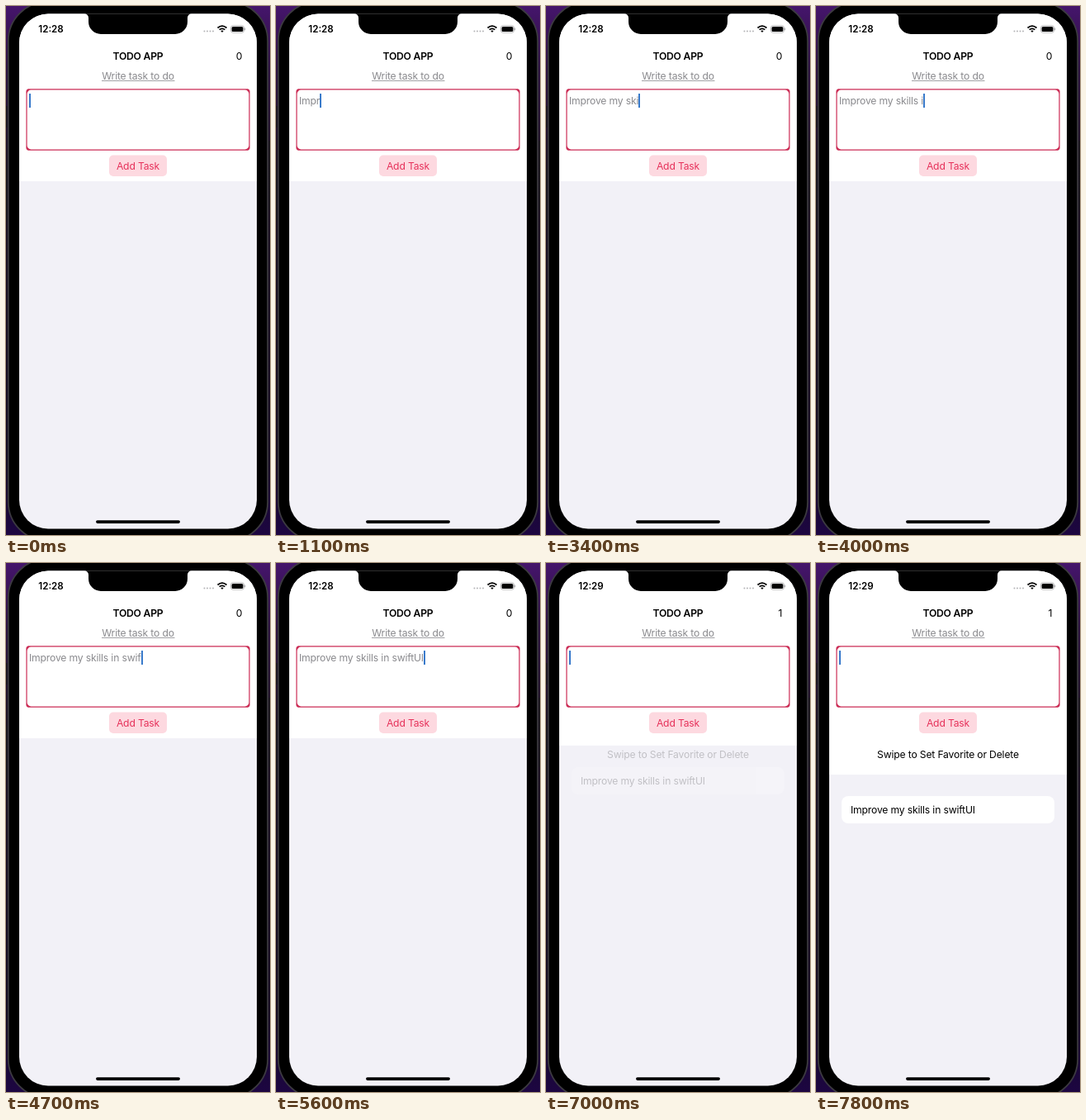
An HTML page that plays this animation: 320 by 640 pixels, repeating every 8 s.

```html
<!DOCTYPE html>
<html lang="en">
<head>
<meta charset="utf-8">
<title>Todo app</title>
<style>
  html, body { margin: 0; width: 100%; height: 100%; overflow: hidden; background: #1a0f24; }
  svg { position: absolute; left: 0; top: 0; }
  text, #field { font: 12.15px Inter, "Liberation Sans", sans-serif; letter-spacing: -.16px; }
  .mid { text-anchor: middle; }
  .bold { font-weight: 600; letter-spacing: -.2px; }
  #clock { font-size: 11.6px; letter-spacing: 0; }
  #field { position: absolute; left: 28px; top: 106px; line-height: 17px; white-space: pre; color: #8a8a8e; }
  #word.marked { background: #c6dff8; color: #6490c2; padding: 1px 0 2px; }
  #caret { position: absolute; width: 2px; height: 17px; background: #3a7bcb; }
</style>
</head>
<body>
<svg width="320" height="640" viewBox="0 0 320 640">
  <defs>
    <linearGradient id="wall" x2="0" y2="1">
      <stop offset="0" stop-color="#45156b"/>
      <stop offset=".12" stop-color="#2b1040"/>
      <stop offset=".3" stop-color="#1a1020"/>
      <stop offset=".85" stop-color="#140a20"/>
      <stop offset="1" stop-color="#1d0642"/>
    </linearGradient>
    <clipPath id="screen"><rect x="16" y="9.600" width="288" height="622.800" rx="35"/></clipPath>
  </defs>
  <rect width="320" height="640" fill="url(#wall)"/>
  <path d="M.5 121v26M.5 197v63M319.500 163v84" stroke="#17151a" stroke-width="2"/>
  <rect x="2.800" y="-5" width="314.400" height="652" rx="47" stroke="#3c3a40" stroke-width="1.800"/>

  <g clip-path="url(#screen)">
    <rect x="16" y="9" width="288" height="624" fill="#f2f1f7"/>
    <rect id="head" x="16" y="9" width="288" height="203" fill="#fff"/>
    <text id="hint" class="mid" x="160" y="235.500">Swipe to Set Favorite or Delete</text>
    <g id="row">
      <rect x="31" y="282" width="258" height="33" rx="8" fill="#fff"/>
      <text x="42" y="302.700">Improve my skills in swiftUI</text>
    </g>
  </g>
  <path d="M95 9.200a5 5 0 0 1 5 5v4.800a15 15 0 0 0 15 15h90a15 15 0 0 0 15-15v-4.800a5 5 0 0 1 5-5z"/>
  <rect x="109" y="622.300" width="102" height="3.600" rx="1.800"/>

  <text id="clock" class="bold" x="39.300" y="32">12:28</text>
  <path d="M240.500 30.500h11" stroke="#b5b5b8" stroke-width="2" stroke-linecap="round" stroke-dasharray="0 3.500"/>
  <g fill="none" stroke="#000" stroke-width="1.700">
    <path d="M256.500 26.500q5.500-4.800 11 0M258.600 28.700q3.400-2.800 6.800 0"/>
    <path d="M260.200 30l1.800 2 1.800-2q-1.800-1.200-3.600 0z" fill="#000" stroke="none"/>
  </g>
  <rect x="272.500" y="23.800" width="16" height="8.400" rx="2.600" fill="none" stroke="#a5a5a8" stroke-width=".8"/>
  <rect x="273.600" y="24.900" width="13.800" height="6.200" rx="1.700"/>
  <path d="M289.700 26.700v2.600" stroke="#a5a5a8"/>

  <text class="mid bold" x="160" y="65">TODO APP</text>
  <text id="count" x="286.300" y="65" text-anchor="end">0</text>
  <text class="mid" x="160" y="89" fill="#8a8a8e">Write task to do</text>
  <path d="M116 90.500h88.500" stroke="#8a8a8e" stroke-width=".8"/>
  <!-- the border is clipped by its box, so only the corners keep the full width -->
  <svg x="24.400" y="100.300" width="271.200" height="74.400">
    <rect width="271.200" height="74.400" rx="6" fill="#fff" stroke="#cb2b54" stroke-width="2.400"/>
  </svg>
  <rect id="button" x="125" y="180.500" width="70" height="25.500" rx="5" fill="#fdd9e0"/>
  <text id="label" class="mid" x="160" y="197.500" fill="#e6315a">Add Task</text>
</svg>
<div id="field"><span id="typed"></span><span id="word"></span><i id="caret"></i></div>

<script>
const LOOP = 8000, TASK = "Improve my skills in swiftUI", WORD_AT = 21;
// moment each character is typed, in tenths of a second
const KEYS = [8, 9, 10, 11, 12, 13, 14, 15, 18, 20, 23, 29, 32, 34, 35, 36, 37, 38, 40, 41, 42, 44, 45, 46, 47, 49, 51, 53];
const BLINKS = [100, 5800, 7400];
const ADDED = 6900;

const $ = id => document.getElementById(id);
const ramp = (t, from, to) => Math.min(1, Math.max(0, (t - from) / (to - from)));
const ease = p => p * p * (3 - 2 * p);

function draw(t) {
  const added = t >= ADDED;
  const text = added ? "" : TASK.slice(0, KEYS.filter(k => k * 100 <= t).length);
  $("typed").textContent = text.slice(0, WORD_AT);
  $("word").textContent = text.slice(WORD_AT);
  $("word").className = t >= 6300 && !added ? "marked" : "";
  $("caret").style.opacity = BLINKS.reduce(
    (o, b) => o - ramp(t, b, b + 150) + ramp(t, b + 250, b + 400), 1);

  $("clock").textContent = t < 6000 ? "12:28" : "12:29";
  $("count").textContent = added ? 1 : 0;
  const press = ramp(t, 6550, 6650) - ramp(t, 6800, 7000);
  $("button").style.opacity = 1 - .35 * press;
  $("label").style.opacity = 1 - .22 * press;

  const p = ease(ramp(t, ADDED, ADDED + 350));
  $("head").setAttribute("height", 203 + 44 * p);
  $("hint").style.opacity = p;
  $("row").style.opacity = p;
  $("row").setAttribute("transform", `translate(0 ${-44 * (1 - p)})`);
}

function tick() {
  draw(performance.now() % LOOP);
  requestAnimationFrame(tick);
}
tick();
</script>
</body>
</html>
```
